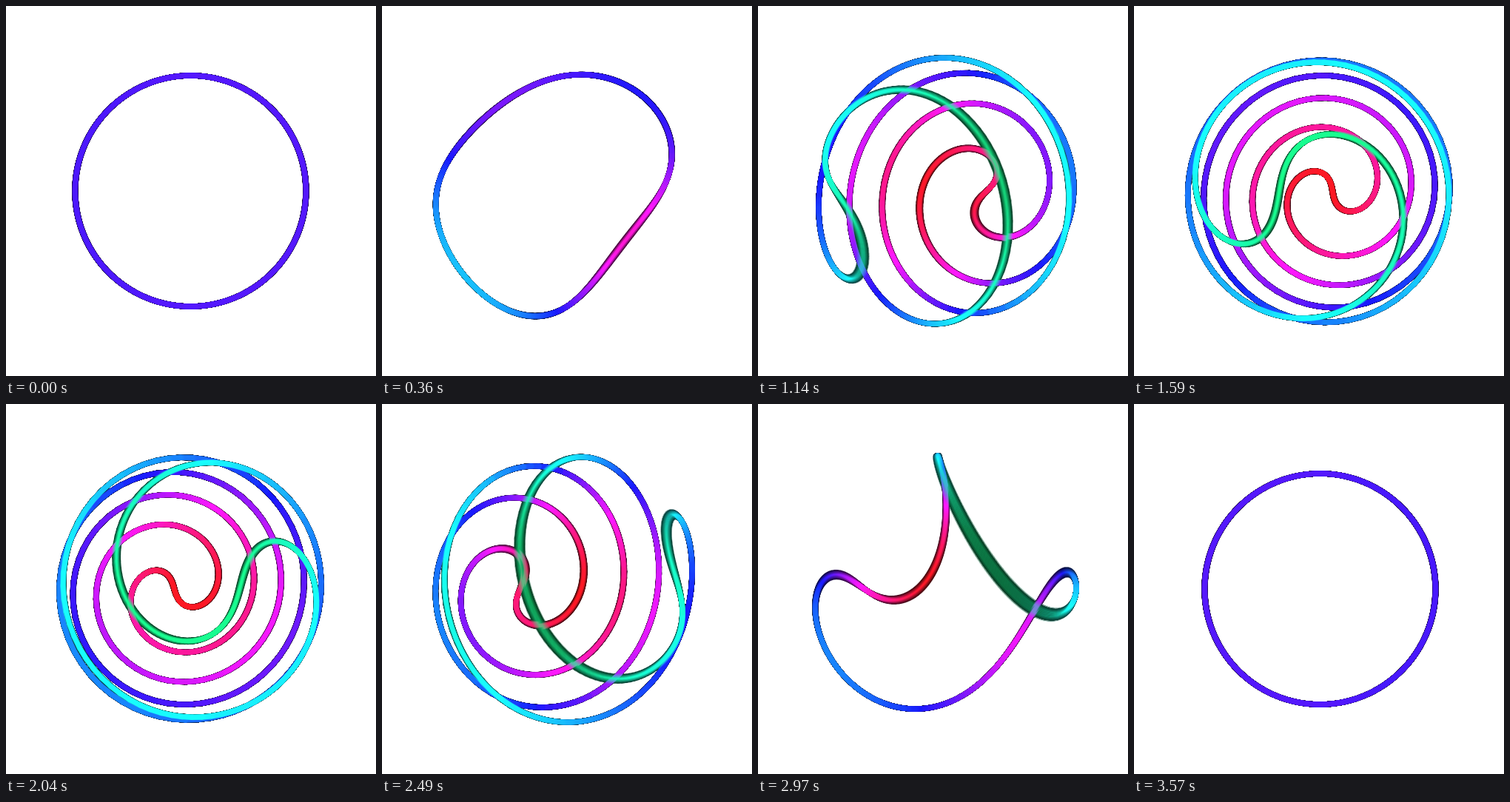
An HTML page with a canvas for the animation above (3.6 s loop, 500x500 px).

```html
<!DOCTYPE html>
<html lang="en">
<head>
<meta charset="utf-8">
<title>Twisting ring</title>
<style>
  html, body { margin: 0; width: 100%; height: 100%; overflow: hidden; background: #fff; }
  canvas { display: block; width: 500px; height: 500px; }
</style>
</head>
<body>
<canvas id="stage" width="500" height="500"></canvas>
<script>
const SIZE = 500, LOOP = 3600, STEP = 30, FRAMES = LOOP / STEP;
const FOCAL = 312, CAMERA = 2;
const MAX_TWIST = 3 * Math.PI, EASE_POWER = 2.2;
const SEGMENTS = 560, SAMPLES = 12, SHUTTER = 0.65, WIDTH = 7.6;

function makeContext(options) {
  const canvas = document.createElement('canvas');
  canvas.width = canvas.height = SIZE;
  return canvas.getContext('2d', options);
}

const screen = document.getElementById('stage').getContext('2d');
const layer = makeContext({ willReadFrequently: true });
const blend = makeContext({ willReadFrequently: true });
layer.lineWidth = WIDTH;
layer.lineCap = 'round';

const clamp = v => Math.max(0, Math.min(1, v));

const ease = p => p < 0.5
  ? 0.5 * (2 * p) ** EASE_POWER
  : 1 - 0.5 * (2 - 2 * p) ** EASE_POWER;

// Hue follows depth: red at the back, blue in the middle, green in front.
const HUES = Array.from({ length: 201 }, (_, i) => hsv(254 - 106 * (i / 100 - 1), 0.92, 255));

function hsv(hue, saturation, value) {
  const channel = n => {
    const k = (n + hue / 60) % 6;
    return Math.round(value * (1 - saturation * clamp(Math.min(k, 4 - k))));
  };
  return `rgb(${channel(5)},${channel(3)},${channel(1)})`;
}

// A great circle twisted about its own axis, turned about the vertical.
function curvePoint(s, twist, tilt) {
  const r = Math.sin(s), axis = Math.cos(s), turn = twist * axis;
  const side = -r * Math.sin(turn), y = -r * Math.cos(turn);
  const x = side * Math.cos(tilt) + axis * Math.sin(tilt);
  const z = axis * Math.cos(tilt) - side * Math.sin(tilt);
  const scale = FOCAL / (CAMERA - z);
  return { x: SIZE / 2 + x * scale, y: SIZE / 2 + y * scale, z };
}

function drawCurve(u) {
  const twist = MAX_TWIST * ease(1 - Math.abs(1 - 2 * u));
  const tilt = Math.PI * (u - 0.5);
  const points = [];
  for (let i = 0; i <= SEGMENTS; i++) {
    points.push(curvePoint(2 * Math.PI * i / SEGMENTS, twist, tilt));
  }
  const pieces = points.slice(1).map((b, i) => ({ a: points[i], b, z: (points[i].z + b.z) / 2 }));
  pieces.sort((p, q) => p.z - q.z);

  layer.clearRect(0, 0, SIZE, SIZE);
  for (const { a, b, z } of pieces) {
    layer.strokeStyle = HUES[Math.round((z + 1) * 100)];
    layer.beginPath();
    layer.moveTo(a.x, a.y);
    layer.lineTo(b.x, b.y);
    layer.stroke();
  }
}

function drawFrame(frame) {
  blend.clearRect(0, 0, SIZE, SIZE);
  blend.globalCompositeOperation = 'lighter';
  blend.globalAlpha = 1 / SAMPLES;
  for (let i = 0; i < SAMPLES; i++) {
    drawCurve(((frame + SHUTTER * i / SAMPLES) / FRAMES) % 1);
    blend.drawImage(layer.canvas, 0, 0);
  }

  // Blurred parts darken instead of fading out to the white ground.
  const image = blend.getImageData(0, 0, SIZE, SIZE), data = image.data;
  for (let i = 0; i < data.length; i += 4) {
    const cover = data[i + 3] / 255;
    const white = 255 * (1 - clamp((cover - 0.06) * 6));
    for (let c = i; c < i + 3; c++) data[c] = data[c] * cover + white;
    data[i + 3] = 255;
  }
  screen.putImageData(image, 0, 0);
}

let shown = -1;
const start = performance.now();

function tick() {
  const frame = Math.floor((performance.now() - start) % LOOP / STEP);
  if (frame !== shown) drawFrame(shown = frame);
  requestAnimationFrame(tick);
}
tick();
</script>
</body>
</html>
```
